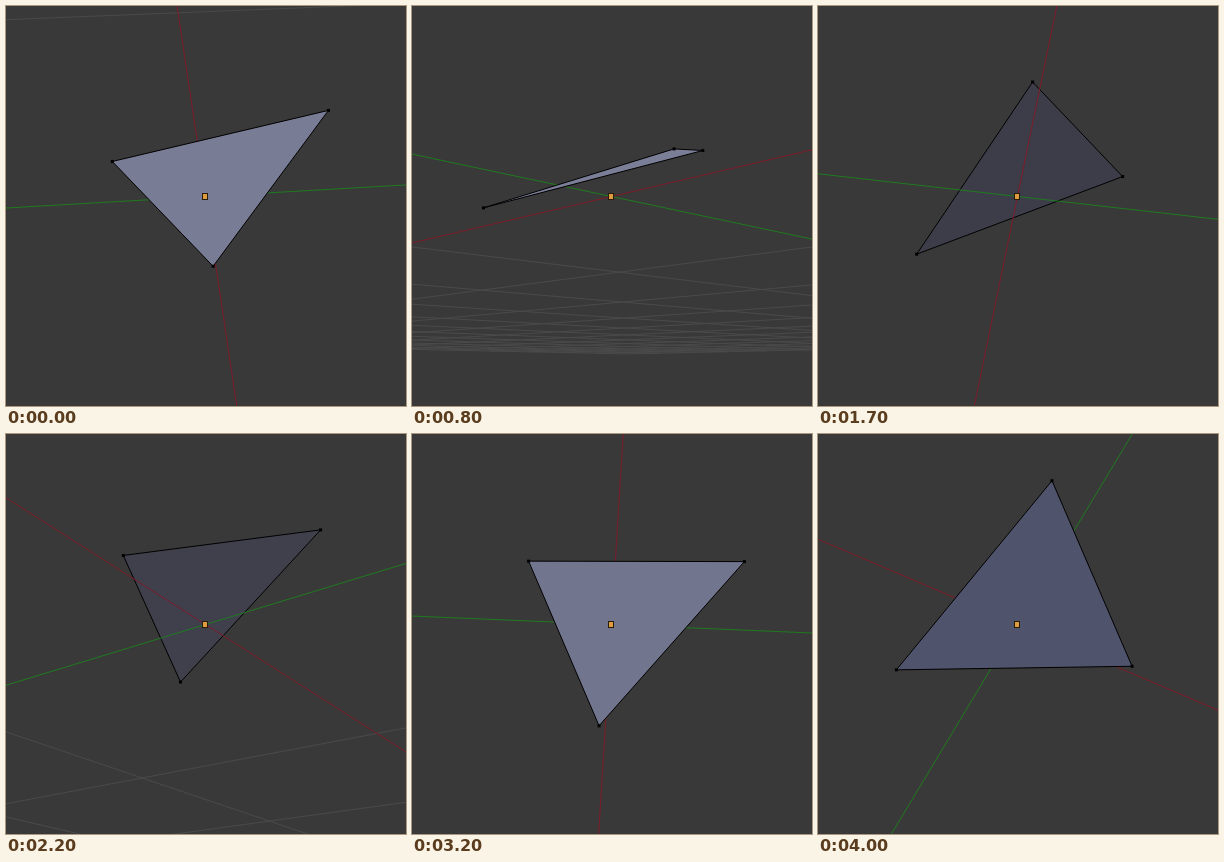
These frames come from a looping animation (400x400 px, 4.1 s). An HTML page with a canvas:

```html
<!DOCTYPE html>
<html lang="en">
<head>
<meta charset="utf-8">
<title>Orbiting triangle</title>
<style>
  html, body { margin: 0; width: 100%; height: 100%; overflow: hidden; background: #393939; }
  canvas { display: block; }
</style>
</head>
<body>
<canvas id="view" width="400" height="400"></canvas>
<script>
const ctx = document.getElementById('view').getContext('2d');
const LOOP = 4100, STEP = 100;
const FOCAL = 765, CX = 199.5, CY = 190.5, NEAR = 0.05;
const CELL = 0.555, CELLS = 12, EXTENT = CELL * CELLS;

// time in ms, azimuth and elevation in degrees
const ORBIT = [
  [0, -5.3, 38.5],
  [500, -31, 10.05],
  [1200, -49.5, -39.3],
  [2200, 34.7, -26.1],
  [2700, 35.9, 35.4],
  [3600, -32.5, 57.8],
  [4000, -63.1, 57.4]
];

// camera distance is 1
const TRIANGLE = [[-0.112, -0.1228, -0.016], [-0.0305, 0.1595, 0.1037], [0.1602, -0.0063, 0.0274]];
const NORMAL = [0.0323, -0.4, 0.916];
const PLANE = 0.0313;

const dot = (a, b) => a[0] * b[0] + a[1] * b[1] + a[2] * b[2];
const mix = (a, b, k) => a + (b - a) * k;

// Cubic through the orbit table with three-point slopes
function slope(i, c) {
  const rate = j => (ORBIT[j + 1][c] - ORBIT[j][c]) / (ORBIT[j + 1][0] - ORBIT[j][0]);
  if (i === 0) return rate(0);
  if (i === ORBIT.length - 1) return rate(i - 1);
  const before = ORBIT[i][0] - ORBIT[i - 1][0];
  const after = ORBIT[i + 1][0] - ORBIT[i][0];
  return (rate(i - 1) * after + rate(i) * before) / (before + after);
}

function orbitAt(t, c) {
  let i = 0;
  while (i < ORBIT.length - 2 && t >= ORBIT[i + 1][0]) i++;
  const span = ORBIT[i + 1][0] - ORBIT[i][0];
  const k = (t - ORBIT[i][0]) / span, q = 1 - k;
  return ORBIT[i][c] * q * q * (1 + 2 * k) + ORBIT[i + 1][c] * k * k * (3 - 2 * k)
    + span * k * q * (slope(i, c) * q - slope(i + 1, c) * k);
}

function cameraAt(t) {
  const a = orbitAt(t, 1) * Math.PI / 180, e = orbitAt(t, 2) * Math.PI / 180;
  const ca = Math.cos(a), sa = Math.sin(a), ce = Math.cos(e), se = Math.sin(e);
  return {
    right: [-sa, ca, 0],
    up: [-se * ca, -se * sa, ce],
    back: [ce * ca, ce * sa, se]
  };
}

const toView = (cam, p) => [dot(p, cam.right), dot(p, cam.up), 1 - dot(p, cam.back)];
const toScreen = v => [CX + FOCAL * v[0] / v[2], CY - FOCAL * v[1] / v[2]];

function line(cam, p, q, color) {
  let a = toView(cam, p), b = toView(cam, q);
  if (a[2] < b[2]) [a, b] = [b, a];
  if (a[2] <= NEAR) return;
  if (b[2] < NEAR) {
    const k = (a[2] - NEAR) / (a[2] - b[2]);
    b = a.map((v, i) => mix(v, b[i], k));
  }
  ctx.strokeStyle = color;
  ctx.beginPath();
  ctx.moveTo(...toScreen(a));
  ctx.lineTo(...toScreen(b));
  ctx.stroke();
}

function drawFloor(cam) {
  ctx.lineWidth = 1;
  for (let i = -CELLS; i <= CELLS; i++) {
    if (i === 0) continue;
    const s = i * CELL;
    line(cam, [s, -EXTENT, 0], [s, EXTENT, 0], '#4a4a4a');
    line(cam, [-EXTENT, s, 0], [EXTENT, s, 0], '#4a4a4a');
  }
  line(cam, [-EXTENT, 0, 0], [EXTENT, 0, 0], '#7c1b29');
  line(cam, [0, -EXTENT, 0], [0, EXTENT, 0], '#1f7a1f');
}

function faceColor(cam, front) {
  const facing = Math.abs(dot(NORMAL, cam.back));
  const light = front
    ? 62.9 + 43.3 * dot(NORMAL, cam.up) - 80.8 * dot(NORMAL, cam.right)
    : Math.max(58, 119.5 - 95 * facing);
  const rgb = front ? [light - 3, light, light + 25] : [light, light, light * 1.2];
  return `rgb(${rgb.map(Math.round).join(',')})`;
}

function drawTriangle(cam, front) {
  const pts = TRIANGLE.map(p => toScreen(toView(cam, p)));
  ctx.beginPath();
  pts.forEach(p => ctx.lineTo(...p));
  ctx.closePath();
  ctx.fillStyle = faceColor(cam, front);
  ctx.fill();
  ctx.strokeStyle = '#000';
  ctx.lineWidth = 1;
  ctx.stroke();
  ctx.fillStyle = '#000';
  pts.forEach(([x, y]) => ctx.fillRect(x - 1.5, y - 1.5, 3, 3));
}

function drawOrigin() {
  ctx.fillStyle = '#2a1d08';
  ctx.fillRect(196, 187, 6, 7);
  ctx.fillStyle = '#dd9c3f';
  ctx.fillRect(197, 188, 4, 5);
}

function draw(t) {
  const cam = cameraAt(t);
  const front = dot(NORMAL, cam.back) > PLANE;
  ctx.fillStyle = '#393939';
  ctx.fillRect(0, 0, 400, 400);
  // The floor axes lie below the face, so the nearer one goes last
  if (front) {
    drawFloor(cam);
    drawTriangle(cam, true);
  } else {
    drawTriangle(cam, false);
    drawFloor(cam);
  }
  drawOrigin();
}

const start = performance.now();
function tick() {
  const t = (performance.now() - start) % LOOP;
  draw(Math.floor(t / STEP) * STEP);
  requestAnimationFrame(tick);
}
tick();
</script>
</body>
</html>
```
